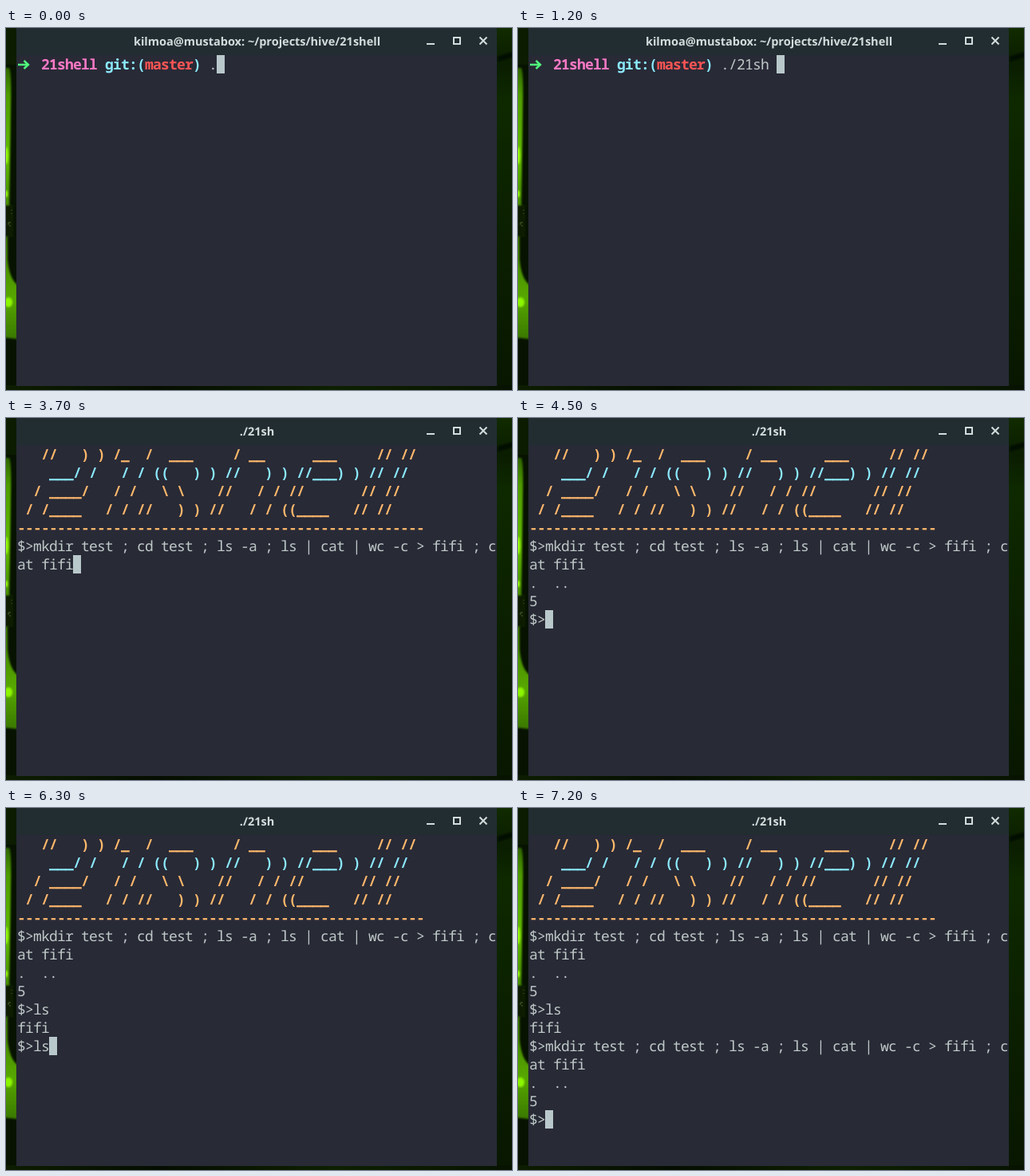
Write an HTML page that moves like this. It is 634 by 454 pixels and loops after 8000 ms.

```html
<!DOCTYPE html>
<html lang="en">
<head>
<meta charset="utf-8">
<title>Terminal session</title>
<style>
  html, body { margin: 0; width: 100%; height: 100%; overflow: hidden; background: #050b00; }
  svg { display: block; width: 634px; height: 454px; }
  text { white-space: pre; text-rendering: geometricPrecision; }
  .term text { font: 18px "Noto Sans Mono", monospace; letter-spacing: -0.8px; fill: #bfc9c8; }
  .term .b { font-weight: 700; }
  .term .orange { fill: #ffb86c; }
  .term .cyan { fill: #8be9fd; }
  .term .pink { fill: #ff79c6; }
  .term .red { fill: #ff5555; }
  #title { font: 700 14.5px "Noto Sans", sans-serif; fill: #d2dcdc; text-anchor: middle; }
</style>
</head>
<body>
<svg viewBox="0 0 634 454">
  <defs>
    <linearGradient id="leaf" x1="0" y1="0" x2="0" y2="1">
      <stop offset="0" stop-color="#2f6600"/>
      <stop offset=".1" stop-color="#4f9c00"/>
      <stop offset=".32" stop-color="#62bd00"/>
      <stop offset=".5" stop-color="#479000"/>
      <stop offset=".62" stop-color="#3c7a00"/>
      <stop offset=".85" stop-color="#58a800"/>
      <stop offset="1" stop-color="#3a7800"/>
    </linearGradient>
    <linearGradient id="side" x1="0" y1="0" x2="0" y2="1">
      <stop offset="0" stop-color="#112b00"/>
      <stop offset=".1" stop-color="#0a1d00"/>
      <stop offset=".2" stop-color="#0e2900"/>
      <stop offset=".55" stop-color="#0b2000"/>
      <stop offset="1" stop-color="#081700"/>
    </linearGradient>
    <linearGradient id="foot">
      <stop offset="0" stop-color="#0c1d00"/>
      <stop offset=".3" stop-color="#050d00"/>
      <stop offset=".65" stop-color="#0d2000"/>
      <stop offset="1" stop-color="#071300"/>
    </linearGradient>
    <filter id="soft" x="-100%" y="-20%" width="300%" height="140%"><feGaussianBlur stdDeviation="1.3"/></filter>
  </defs>

  <rect width="634" height="454" fill="#071300"/>
  <rect width="14" height="46" fill="#0b1c00"/>
  <rect x="615" width="19" height="454" fill="url(#side)"/>
  <rect y="448" width="634" height="6" fill="url(#foot)"/>
  <g filter="url(#soft)">
    <path d="M-4 50H4Q7 54 6 100L4 230 2 250V290Q4 314 14 322V390L-4 388Z" fill="url(#leaf)"/>
    <ellipse cx="0" cy="160" rx="2.5" ry="11" fill="#9cff10"/>
    <ellipse cx="0" cy="208" rx="2" ry="4" fill="#9cff10"/>
    <ellipse cx="3" cy="344" rx="5" ry="6" fill="#8cf500"/>
    <path d="M-2 222H9V262H-2Z" fill="#101c00"/>
    <path d="M616 36L636 30V36L616 42Z" fill="#030800"/>
  </g>
  <path d="M3 247v-3h3M7 228v1M7 232v1M4 248h2" stroke="#4d6330" fill="none"/>

  <rect x="13" width="602" height="449" fill="#282a36"/>
  <rect x="13" width="602" height="34" fill="#222d32"/>
  <text id="title" x="314.5" y="22"></text>
  <g stroke="#d2dcdc" stroke-width="2" fill="none">
    <path d="M527 20H537M593.5 11.5L602.500 20.500M602.500 11.500L593.500 20.500"/>
    <rect x="561" y="12" width="8" height="8"/>
  </g>

  <g class="term">
    <rect id="cursor" width="10" height="23" fill="#b9c8cb"/>
    <g id="prompt">
      <path d="M15 46H28M22.500 41L28 46 22.500 51" stroke="#50fa7b" stroke-width="2.400" fill="none"/>
    </g>
    <g id="logo"></g>
    <g id="body"></g>
  </g>
</svg>
<script>
const LOOP = 8000, COLS = 60, CW = 10, CH = 23, LEFT = 14, TOP = 34;
const $ = id => document.getElementById(id);

function addText(parent, col, row, str, cls = '') {
  const el = document.createElementNS('http://www.w3.org/2000/svg', 'text');
  el.setAttribute('x', LEFT + col * CW);
  el.setAttribute('y', TOP + row * CH + 18);
  el.setAttribute('class', cls);
  el.textContent = str;
  parent.appendChild(el);
}

addText($('prompt'), 3, 0, '21shell', 'b pink');
addText($('prompt'), 11, 0, 'git:(', 'b cyan');
addText($('prompt'), 16, 0, 'master', 'b red');
addText($('prompt'), 22, 0, ')', 'b cyan');

[
  '   //   ) ) /_  /  ___     / __      ___     // //',
  '    ___/ /   / / ((   ) ) //   ) ) //___) ) // //',
  '  / ____/   / /   \\ \\    //   / / //       // //',
  ' / /____   / / //   ) ) //   / / ((____   // //',
  '-'.repeat(51)
].forEach((line, i) => addText($('logo'), 0, i, line, i === 1 ? 'b cyan' : 'b orange'));

const CMD = '$>mkdir test ; cd test ; ls -a ; ls | cat | wc -c > fifi ; cat fifi';
const RUN = CMD + '\n.  ..\n5\n$>';
const LISTED = RUN + 'ls\nfifi\n';

// [start ms, inside the new shell, typed and printed text]
const STEPS = [
  [0, false, '.'],
  [300, false, './'],
  [800, false, './2'],
  [900, false, './21'],
  [1200, false, './21sh '],
  [1600, true, '$>'],
  [3700, true, CMD],
  [4500, true, RUN],
  [5600, true, RUN + 'ls'],
  [5800, true, LISTED + '$>'],
  [6300, true, LISTED + '$>ls'],
  [6500, true, LISTED + CMD],
  [7200, true, LISTED + RUN]
];

function wrap(str) {
  const out = [];
  for (let line of str.split('\n')) {
    while (line.length > COLS) {
      out.push(line.slice(0, COLS));
      line = line.slice(COLS);
    }
    out.push(line);
  }
  return out;
}

function show([, inShell, str]) {
  const col = inShell ? 0 : 24, row = inShell ? 5 : 0;
  const lines = wrap(str), last = lines.length - 1;
  $('title').textContent = inShell ? './21sh' : 'kilmoa@mustabox: ~/projects/hive/21shell';
  $('prompt').style.display = inShell ? 'none' : '';
  $('logo').style.display = inShell ? '' : 'none';
  $('body').replaceChildren();
  lines.forEach((line, i) => addText($('body'), col, row + i, line));
  $('cursor').setAttribute('x', LEFT + (col + lines[last].length) * CW);
  $('cursor').setAttribute('y', TOP + (row + last) * CH);
}

let start, current;
function tick(now) {
  start ??= now;
  const t = (now - start) % LOOP;
  const step = STEPS.findLast(s => s[0] <= t) || STEPS[0];
  if (step !== current) show(current = step);
  requestAnimationFrame(tick);
}
show(current = STEPS[0]);
requestAnimationFrame(tick);
</script>
</body>
</html>
```
